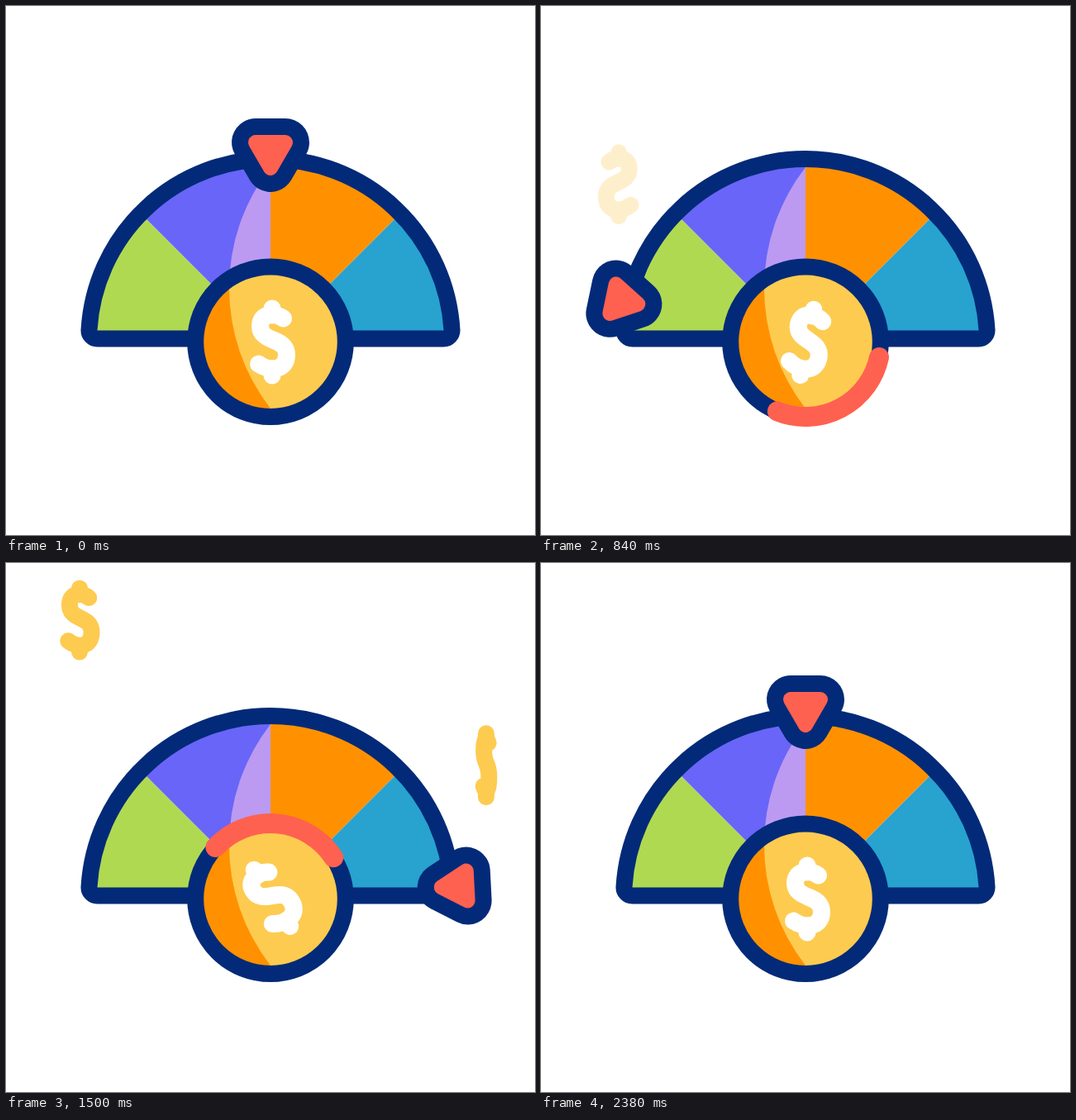
An HTML page for the animation above (2400 ms loop, 640 px wide and 640 px high).

```html
<!DOCTYPE html>
<html lang="en">
<head>
<meta charset="utf-8">
<title>Prize wheel</title>
<style>
  html, body { margin: 0; width: 100%; height: 100%; overflow: hidden; background: #fff; }
  svg { display: block; width: 100vw; height: 100vh; }
  .line { fill: none; stroke: #032a78; stroke-width: 20; stroke-linejoin: round; }
  .dollar { fill: none; stroke-width: 20; stroke-linecap: round; stroke-linejoin: round; }
</style>
</head>
<body>
<svg viewBox="0 0 640 640">
  <defs>
    <path id="dome" d="M110.5 402.5a10 10 0 0 1-10-10.5A219.88 219.88 0 0 1 539.5 392a10 10 0 0 1-10 10.5Z"/>
    <path id="sign" vector-effect="non-scaling-stroke" d="M13.5-28.5C4-35.5-14.5-35.5-14.5-19.5C-14.5 1.5 17.5-6.5 17.5 15.5C17.5 35.5-4 35.5-16.5 26.5M0-40.5v8M0 40.5v-8"/>
    <path id="tip" d="M302 165H338L320 196Z" stroke-linejoin="round"/>
    <clipPath id="inDome"><use href="#dome"/></clipPath>
    <clipPath id="inCoin"><circle cx="320" cy="406" r="91"/></clipPath>
  </defs>

  <g clip-path="url(#inDome)">
    <path fill="#b0d952" d="M320 408L20 108V408Z"/>
    <path fill="#6965f8" d="M320 408L20 108H320Z"/>
    <path fill="#bc9af2" d="M320 195A238 238 0 0 0 320 487Z"/>
    <path fill="#ff9100" d="M320 408V108H620Z"/>
    <path fill="#28a2cf" d="M320 408L620 108V408Z"/>
  </g>
  <use href="#dome" class="line"/>

  <g id="pointer">
    <use href="#tip" stroke="#032a78" stroke-width="58"/>
    <use href="#tip" fill="#ff6150" stroke="#ff6150" stroke-width="18"/>
  </g>

  <g clip-path="url(#inCoin)">
    <path fill="#ff9100" d="M220 300H420V510H220Z"/>
    <path fill="#fdcb50" d="M320 195A238 238 0 0 0 320 487L430 510V195Z"/>
  </g>
  <circle class="line" cx="320" cy="406.2" r="90.8"/>
  <path id="arc" fill="none" stroke="#ff6150" stroke-width="24" stroke-linecap="round"/>
  <g id="coinSign" class="dollar" stroke="#fff" style="stroke-width:21"><use href="#sign"/></g>
  <g id="leftSign" class="dollar" stroke="#fdcb50"><use href="#sign"/></g>
  <g id="rightSign" class="dollar" stroke="#fdcb50"><use href="#sign"/></g>
</svg>
<script>
const LOOP = 2400;
const el = id => document.getElementById(id);
const [pointer, arc, coinSign, leftSign, rightSign] =
  ['pointer', 'arc', 'coinSign', 'leftSign', 'rightSign'].map(el);

// [time, degrees]
const pointerSwing = [[0, 0], [342, -87], [555, 30], [760, -87], [1354, 87],
  [1792, 87], [2130, -53], [2275, 29], [2375, 0], [LOOP, 0]];
const coinSwing = [[0, 0], [360, -45], [770, 13], [1440, -36], [1760, 0], [LOOP, 0]];

const progress = (t, from, to) => Math.min(1, Math.max(0, (t - from) / (to - from)));

function swing(keys, t) {
  const i = keys.findIndex(key => key[0] > t);
  const [t0, a] = keys[i - 1], [t1, b] = keys[i];
  const p = progress(t, t0, t1);
  return a + (b - a) * p * p * (3 - 2 * p);
}

function ringPoint(degrees) {
  const a = degrees * Math.PI / 180;
  return `${320 + 91 * Math.cos(a)} ${406 + 91 * Math.sin(a)}`;
}

function drawArc(t) {
  const edge = start => 112 - 249 * progress(t, start, start + 640) ** 1.45;
  const head = edge(500), tail = edge(1060), span = tail - head;
  arc.setAttribute('d', span < 0.1 ? '' :
    `M${ringPoint(tail)}A91 91 0 ${span > 180 ? 1 : 0} 0 ${ringPoint(head)}`);
}

// A sign rises at constant speed while it turns about an upright axis beside its middle
function drawFloating(sign, t, dx, dy) {
  const y = 216 + dy - 0.2222 * (t - 840);
  const turn = 1 - 2 * (1 - progress(t, 822, 1726)) ** 2;
  sign.setAttribute('transform',
    `translate(${91.5 + dx} ${y}) scale(${0.95 * turn} .95) translate(-3 0)`);
  sign.setAttribute('opacity', progress(t, 805, 930) * (1 - progress(t, 1530, 1600)));
}

function draw(now) {
  const t = now % LOOP;
  pointer.setAttribute('transform', `rotate(${swing(pointerSwing, t)} 320 403)`);
  coinSign.setAttribute('transform', `rotate(${swing(coinSwing, t)} 320 406) translate(322 406.5)`);
  drawArc(t);
  drawFloating(leftSign, t, 0, 0);
  drawFloating(rightSign, t - 345, 490, 99);
}

function tick() {
  draw(performance.now());
  requestAnimationFrame(tick);
}
tick();
</script>
</body>
</html>
```
